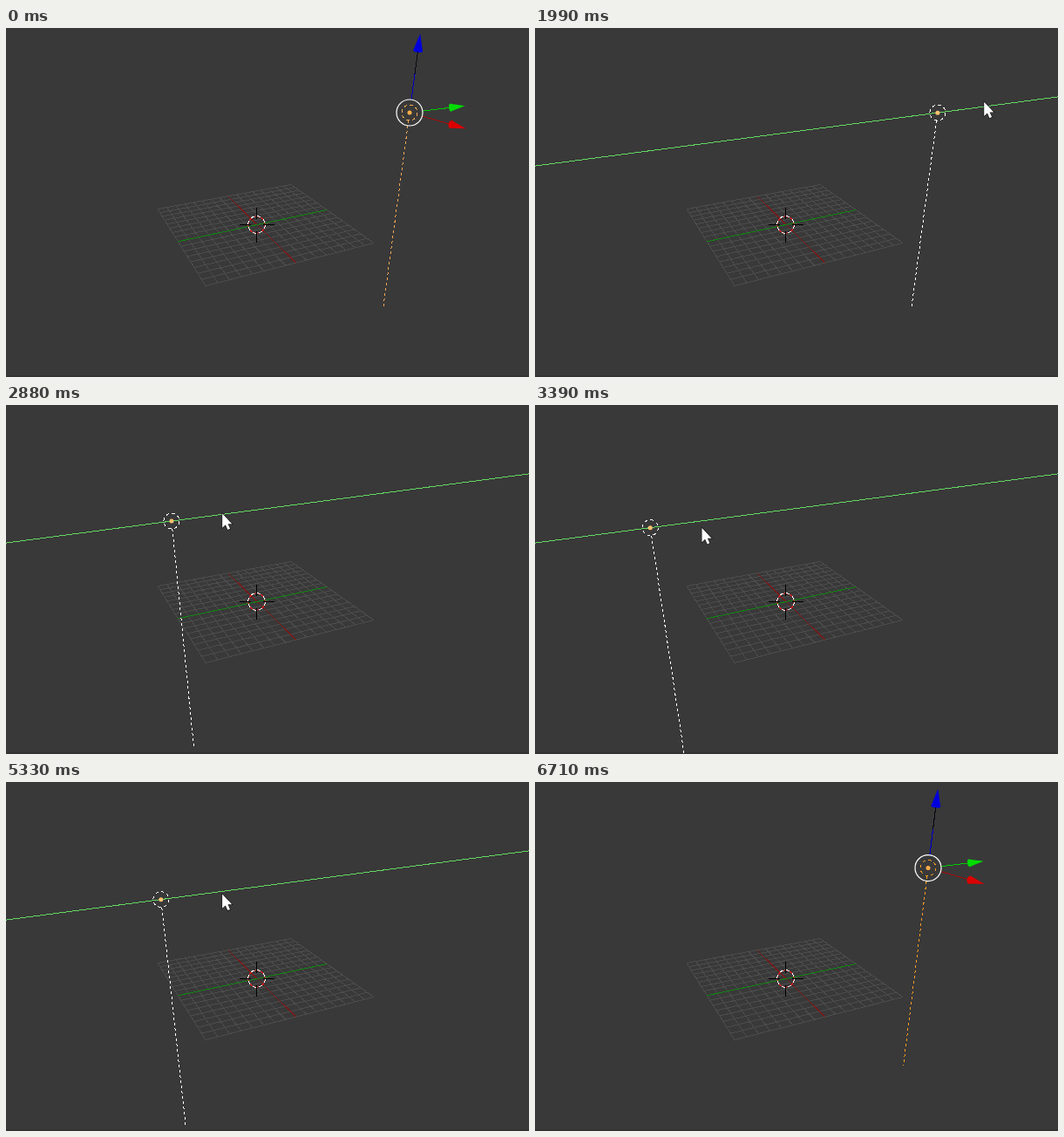
Animation, 600 px wide and 400 px high, one loop 7600 ms. Source, as an HTML page:

```html
<!DOCTYPE html>
<html lang="en">
<head>
<meta charset="utf-8">
<title>Moving a lamp along one axis</title>
<style>
html, body { margin: 0; width: 100%; height: 100%; overflow: hidden; background: #393939; }
svg { display: block; width: 600px; height: 400px; }
.crisp { shape-rendering: crispEdges; }
</style>
</head>
<body>
<svg viewBox="0 0 600 400" fill="none">
  <rect width="600" height="400" fill="#393939"/>
  <rect y="398" width="600" height="2" fill="#323232"/>
  <g id="floor" class="crisp"></g>
  <g id="scene"></g>
  <path id="pointer" d="M.3 .8V17L4 13.6L6.5 19.3L9.2 18.1L6.7 12.5H11.4Z" fill="#fff" stroke="#111" stroke-width="1.2" paint-order="stroke"/>
</svg>
<script>
const LOOP = 7600;
const byId = id => document.getElementById(id);
const line = (x1, y1, x2, y2, color, extra = '') =>
  `<path class="crisp" d="M${x1} ${y1}L${x2} ${y2}" stroke="${color}" ${extra}/>`;
const ring = (x, y, r, color, extra = '') =>
  `<circle cx="${x}" cy="${y}" r="${r}" stroke="${color}" ${extra}/>`;
const mix = (a, b, u) => a + (b - a) * u;
const progress = (t, from, to) => Math.min(1, Math.max(0, (t - from) / (to - from)));
const smooth = u => u * u * (3 - 2 * u);

// Projective map from the unit square to the floor's four corners.
function quadMap([ax, ay], [bx, by], [cx, cy], [dx, dy]) {
  const x1 = bx - cx, x2 = dx - cx, x3 = ax - bx + cx - dx;
  const y1 = by - cy, y2 = dy - cy, y3 = ay - by + cy - dy;
  const det = x1 * y2 - x2 * y1;
  const g = (x3 * y2 - x2 * y3) / det, h = (x1 * y3 - x3 * y1) / det;
  return (u, v) => {
    const w = g * u + h * v + 1;
    return [
      (ax + (bx - ax + g * bx) * u + (dx - ax + h * dx) * v) / w,
      (ay + (by - ay + g * by) * u + (dy - ay + h * dy) * v) / w
    ];
  };
}

function drawFloor() {
  const at = quadMap([174, 207.5], [327, 179.5], [422, 246.5], [229, 295.5]);
  const cells = 16;
  let out = '';
  for (let i = 0; i <= cells; i++) {
    const k = i / cells;
    out += line(...at(k, 0), ...at(k, 1), '#4c4c4c');
    out += line(...at(0, k), ...at(1, k), '#4c4c4c');
  }
  out += line(...at(.5, 0), ...at(.5, 1), '#801616');
  out += line(...at(0, .5), ...at(1, .5), '#128412');
  const x = 287.5, y = 225.5;
  out += ring(x, y, 9.8, '#d82020') + ring(x, y, 9.8, '#fff', 'stroke-dasharray="4.6 3.1"');
  for (const s of [-1, 1]) {
    out += line(x + 7 * s, y, x + 20 * s, y, '#000');
    out += line(x, y + 7 * s, x, y + 20 * s, '#000');
  }
  byId('floor').innerHTML = out;
}

const RIGHT = 463, LEFT = 129.5, END = 451;

// Two drags: left in three pulls, then back in one.
function lampX(t) {
  if (t >= 5150) return mix(LEFT, END, smooth(progress(t, 5150, 5890)));
  if (t >= 3110) return mix(148, LEFT, progress(t, 3110, 3440));
  if (t >= 2320) return mix(433, 148, smooth(progress(t, 2320, 3060)));
  return mix(RIGHT, 433, progress(t, 1900, 2090) ** 4.5);
}

// While dragging, the pointer keeps nearly the same distance from the lamp.
function grip(x, back) {
  const u = (x - LEFT) / (RIGHT - LEFT);
  return back
    ? [200 + .99 * (x - LEFT), 131 - 22 * u]
    : [188.5 + .982 * (x - LEFT), 84 + 57 * (1 - u) ** 1.8];
}

function glide(t, from, to, [ax, ay], [bx, by]) {
  const u = smooth(progress(t, from, to));
  return [mix(ax, bx, u), mix(ay, by, u)];
}

function pointerAt(t, x) {
  const aside = [365, 178], turn = [172, 131], overshoot = [503, 92];
  if (t < 1110 || t >= 6710) return [650, 0];
  if (t < 1565) return glide(t, 1110, 1565, [598, 137], overshoot);
  if (t < 1900) return glide(t, 1565, 1750, overshoot, grip(RIGHT));
  if (t < 3500) return grip(x);
  if (t < 4310) return glide(t, 3500, 3800, grip(LEFT), aside);
  if (t < 4740) return glide(t, 4310, 4740, aside, turn);
  if (t < 5150) return glide(t, 4740, 4870, turn, grip(LEFT, true));
  return t < 6350 ? grip(x, true) : glide(t, 6350, 6710, grip(END, true), [605, 315]);
}

// Vanishing point of the vertical lines.
const VX = 303, VY = 1280;
const railY = x => 158.1 - .132 * x;

function stem(x, y, color) {
  const slope = .3177;
  const s = (322 + slope * (432.5 - x) - y) / (VY - y + slope * (VX - x));
  const k = 9 / (VY - y);
  const height = (VY - y) * (s - k);
  return line(mix(x, VX, k), y + 9, mix(x, VX, s), mix(y, VY, s), color,
    `pathLength="${height}" stroke-dasharray="3"`);
}

// Shaft and cone from the lamp centre towards (dx, dy).
function arrow(x, y, dx, dy, head, half, depth, color, shaft) {
  const len = Math.hypot(dx, dy), ux = dx / len, uy = dy / len;
  const bx = x + dx - ux * head, by = y + dy - uy * head;
  const turn = Math.atan2(dy, dx) * 180 / Math.PI;
  return line(x + ux * 15, y + uy * 15, bx, by, shaft) +
    `<g transform="translate(${bx} ${by}) rotate(${turn})" fill="${color}">` +
    `<path d="M0 ${-half}L${head} 0L0 ${half}Z"/><ellipse rx="${depth}" ry="${half}"/></g>`;
}

function gizmo(x, y) {
  const left = x < 300;
  const up = left ? -87 : -90.5;
  const ux = (VX - x) / (VY - y) * up;
  let out = left
    ? `<path d="M${x + 8} ${y + 14.5}h7l2 2v6l-2 2h-6l-2-2v-6z" fill="#981414"/>`
    : arrow(x, y, 64.5, 18.3, 17.5, 4.5, 3, '#dc0000', '#a80808');
  out += arrow(x, y, left ? 80.5 : 63.5, left ? -11 : -7.8, 16.5, 4.4, 2, '#00dc00', '#00c800');
  out += arrow(x, y, ux, up, 20, 5.5, 1.6, '#0000dc', '#0000c0');
  if (!left) out += line(x + ux * .49, y + up * .49, x + ux * .77, y + up * .77, '#080812');
  return out + ring(x, y, 15, '#fff', 'stroke-width="1.2"');
}

function render(t) {
  const x = lampX(t), y = railY(x);
  const [px, py] = pointerAt(t, x);
  const drag = t >= 1900 && t < 3500 || t >= 5150 && t < 6350;
  const color = drag ? '#fff' : t < 5150 ? '#f1a854' : '#f89c22';
  let out = drag ? line(0, railY(0), 600, railY(600), '#62d862') : '';
  out += stem(x, y, color);
  out += ring(x, y, 9, color, 'class="crisp" stroke-dasharray="3.53"');
  if (!drag) out += gizmo(x, y);
  out += `<circle cx="${x}" cy="${y}" r="2.5" fill="${drag ? '#ffc070' : '#ffac48'}"/>`;
  byId('scene').innerHTML = out;
  byId('pointer').setAttribute('transform', `translate(${px} ${py})`);
}

const start = performance.now();
function tick() {
  render((performance.now() - start) % LOOP);
  requestAnimationFrame(tick);
}
drawFloor();
tick();
</script>
</body>
</html>
```
